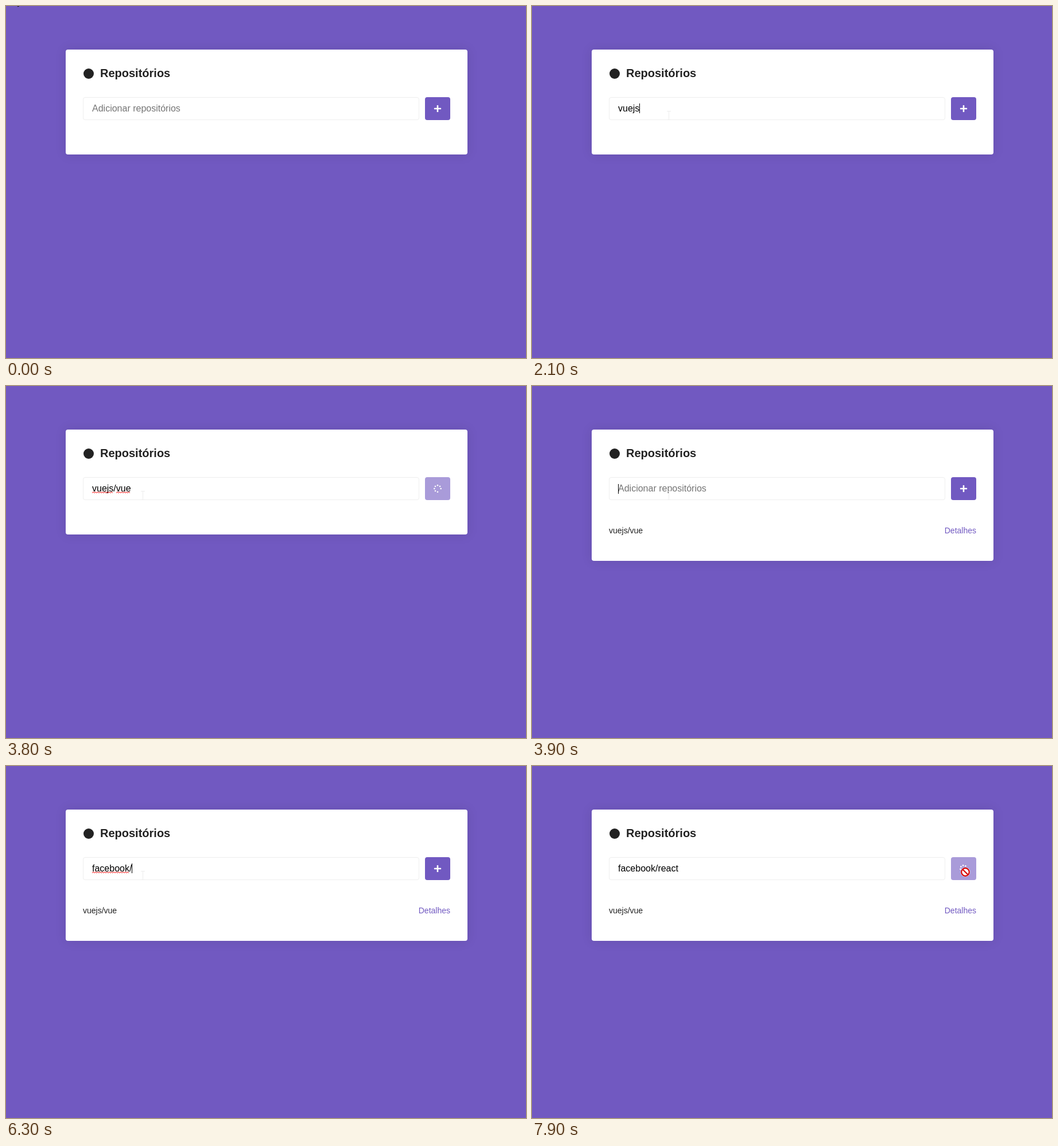
These frames come from a looping animation (906x614 px, 8000 ms). An HTML page:

```html
<!DOCTYPE html>
<html lang="pt">
<head>
<meta charset="utf-8">
<title>Repositórios</title>
<style>
  html, body { margin: 0; width: 100%; height: 100%; overflow: hidden; background: #7159c1; }
  body { position: relative; font-family: Arial, "Liberation Sans", sans-serif; }
  #card {
    position: absolute; left: 104px; top: 76px; width: 700px; height: 183px;
    background: #fff; border-radius: 4px; box-shadow: 0 0 20px rgba(0, 0, 0, .1);
  }
  svg { position: absolute; left: 0; top: 0; }
  text { white-space: pre; }
</style>
</head>
<body>
<div id="card"></div>
<svg width="906" height="614" viewBox="0 0 906 614">
  <circle cx="144" cy="118" r="9" fill="#222"/>
  <text x="164" y="124" font-size="20" font-weight="700" fill="#222">Repositórios</text>

  <rect x="134.5" y="159.5" width="585" height="39" rx="3.5" fill="#fff" stroke="#eee"/>
  <text id="hint" x="150" y="184" font-size="16" fill="#757575">Adicionar repositórios</text>
  <text id="value" x="150" y="184" font-size="16"></text>
  <path id="wave" fill="none" stroke="#f00" stroke-width="1"/>
  <rect id="caret" width="1" height="17"/>

  <g id="button">
    <rect x="730" y="159" width="44" height="40" rx="4" fill="#7159c1"/>
    <g id="plus" fill="#fff">
      <rect x="745.9" y="177.7" width="12.2" height="2.6" rx=".9"/>
      <rect x="750.7" y="172.9" width="2.6" height="12.2" rx=".9"/>
    </g>
    <g id="spinner" fill="#fff"></g>
  </g>

  <g id="item" font-size="14">
    <text x="134" y="257" fill="#222">vuejs/vue</text>
    <text x="774" y="257" fill="#7159c1" text-anchor="end">Detalhes</text>
  </g>

  <g id="pointer">
    <path id="arrow" d="M0 0V17l4-4 2.5 6 2.5-1-2.5-5.5H12z" fill="#fff" stroke="#000"/>
    <path id="beam" d="M-3 -7.5H4M.5 -7.5V7.5M-3 7.5H4" fill="none" stroke="#ededed"/>
    <path id="hand" fill="#fff" stroke="#000" stroke-linejoin="round"
      d="M-1.5 13V2a1.7 1.7 0 0 1 3.4 0V8c1-1 3-.6 3.2 1 1-1 2.8-.6 3 .8 1.2-.7 2.6 0 2.6 1.6V16c0 2-1.5 3-1.5 5.5H-.5C-1 18-5.5 15-6 12.5c-.3-2 1.8-2 2.6-1z"/>
    <g id="denied">
      <circle r="8.3" fill="#fff"/>
      <path d="M-4.8 -4.8L4.8 4.8" stroke="#d60000" stroke-width="2.2"/>
      <circle r="6.8" fill="none" stroke="#d60000" stroke-width="2.2"/>
    </g>
  </g>
</svg>
<script>
const LOOP = 8000, STEP = 100, LEFT = 150;
const $ = id => document.getElementById(id);
const show = (id, on) => { $(id).style.display = on ? '' : 'none'; };

// [time, text in the field]
const typing = [
  [0, ''], [1600, 'v'], [1800, 'vue'], [1900, 'vuej'], [2100, 'vuejs'], [2400, 'vuejs/'],
  [2600, 'vuejs/v'], [2700, 'vuejs/vu'], [2800, 'vuejs/vue'], [3900, ''],
  [5100, 'f'], [5200, 'fa'], [5400, 'face'], [5700, 'facebo'], [5800, 'faceboo'],
  [6000, 'facebook'], [6300, 'facebook/'], [6500, 'facebook/r'], [6600, 'facebook/re'],
  [6700, 'facebook/rea'], [6800, 'facebook/reac'], [7000, 'facebook/react']
];
// [time, misspelt words]
const spelling = [[0, []], [2400, ['vuejs']], [3400, ['vuejs', 'vue']], [3900, []],
  [6300, ['facebook']], [7800, []]];
const carets = [[0, false], [1400, true], [3400, false], [3900, true], [4500, false],
  [5100, true], [7500, false]];
const shapes = [[0, 'arrow'], [500, 'beam'], [7700, 'hand'], [7800, 'denied']];
// [time, x, y]
const path = [[0, 14, -18], [100, 14, -18], [500, 220, 112], [600, 220, 112], [900, 228, 176],
  [1000, 228, 176], [1400, 238, 191], [7100, 238, 191], [7200, 614, 176], [7400, 614, 176],
  [7700, 755, 185], [LOOP, 755, 185]];
const loads = [[3400, 3900], [7800, LOOP]];

const at = (table, t) => table.filter(row => row[0] <= t).pop()[1];

function place(t) {
  const i = path.findIndex(p => p[0] > t);
  const [t0, x0, y0] = path[i - 1], [t1, x1, y1] = path[i];
  const k = (t - t0) / (t1 - t0);
  return [Math.round(x0 + (x1 - x0) * k), Math.round(y0 + (y1 - y0) * k)];
}

const pen = document.createElement('canvas').getContext('2d');
pen.font = '16px Arial, "Liberation Sans", sans-serif';
const width = s => pen.measureText(s).width;

function zigzag(text, word) {
  const start = text.startsWith(word) && !text.endsWith('/' + word) ? 0 : text.lastIndexOf(word);
  const from = Math.round(LEFT + width(text.slice(0, start)));
  const to = from + width(word);
  let d = `M${from} 186.5`;
  for (let x = from + 2, up = true; x <= to; x += 2, up = !up) d += `L${x} ${up ? 184.8 : 186.5}`;
  return d;
}

// Seven dots on a ring, the top right one left out
for (let i = 0; i < 8; i++) {
  if (i === 1) continue;
  const a = (i - 2) * Math.PI / 4;
  const dot = document.createElementNS('http://www.w3.org/2000/svg', 'circle');
  dot.setAttribute('cx', 5.7 * Math.cos(a));
  dot.setAttribute('cy', 5.7 * Math.sin(a));
  dot.setAttribute('r', 1.3);
  $('spinner').append(dot);
}

function draw(t) {
  const text = at(typing, t);
  $('value').textContent = text;
  show('hint', !text);
  $('wave').setAttribute('d', at(spelling, t).map(w => zigzag(text, w)).join(''));

  show('caret', at(carets, t));
  $('caret').setAttribute('x', Math.round(LEFT + width(text)));
  $('caret').setAttribute('y', text ? 170 : 171);

  const load = loads.find(([a, b]) => t >= a && t < b);
  $('button').setAttribute('opacity', load ? .6 : 1);
  show('plus', !load);
  show('spinner', load);
  if (load) {
    const turn = (t - load[0] + STEP) / 2000 * 360;
    $('spinner').setAttribute('transform', `translate(752 179) rotate(${turn})`);
  }

  const added = t >= 3900;
  show('item', added);
  $('card').style.height = (added ? 229 : 183) + 'px';

  const shape = at(shapes, t);
  for (const id of ['arrow', 'beam', 'hand', 'denied']) show(id, id === shape);
  $('pointer').setAttribute('transform', `translate(${place(t)})`);
}

const begin = performance.now();
function tick() {
  const t = (performance.now() - begin) % LOOP;
  draw(Math.floor(t / STEP) * STEP);
  requestAnimationFrame(tick);
}
tick();
</script>
</body>
</html>
```
